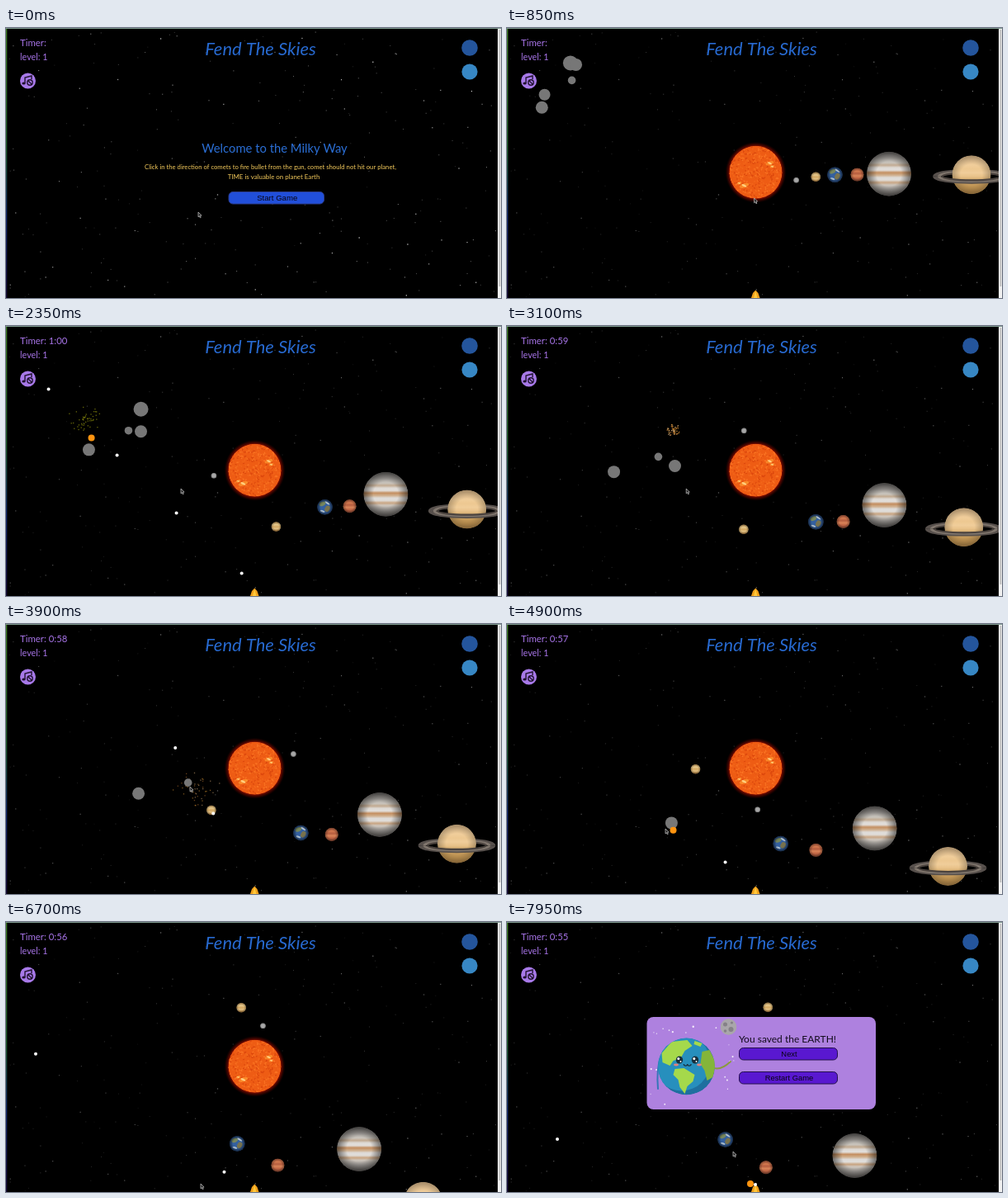
These frames come from a looping animation (600 by 327 pixels, 8 s). An HTML page with a canvas:

```html
<!DOCTYPE html>
<html lang="en">
<head>
<meta charset="utf-8">
<style>
  html, body { margin: 0; width: 100%; height: 100%; overflow: hidden; background: #000; }
  canvas { display: block; }
</style>
</head>
<body>
<canvas id="stage" width="600" height="327"></canvas>
<script>
const ctx = document.getElementById('stage').getContext('2d');
const TAU = Math.PI * 2;
const LOOP = 8000, START = 750, WIN = 7270;
const SUN = { x: 301.5, y: 174.8, r: 32 };
const GUN = { x: 301, y: 325 };
const BULLET_SPEED = 0.6;
const TITLE_FONT = 'Lato, sans-serif';
const BUTTON_FONT = '"Liberation Sans", Arial, sans-serif';

function seeded(seed) {
  return () => (seed = (seed * 16807) % 2147483647) / 2147483647;
}

function disc(x, y, r, fill) {
  ctx.fillStyle = fill;
  ctx.beginPath();
  ctx.arc(x, y, r, 0, TAU);
  ctx.fill();
}

function oval(x, y, rx, ry, fill, angle = 0) {
  ctx.fillStyle = fill;
  ctx.beginPath();
  ctx.ellipse(x, y, rx, ry, angle, 0, TAU);
  ctx.fill();
}

function shape(points, fill) {
  ctx.fillStyle = fill;
  ctx.beginPath();
  points.forEach(([x, y]) => ctx.lineTo(x, y));
  ctx.closePath();
  ctx.fill();
}

function text(string, x, y, size, color, family = TITLE_FONT, align = 'center', style = '') {
  ctx.font = `${style} ${size}px ${family}`;
  ctx.textAlign = align;
  ctx.fillStyle = color;
  ctx.fillText(string, x, y);
}

function box(x, y, w, h, r, fill, stroke) {
  ctx.beginPath();
  ctx.roundRect(x, y, w, h, r);
  ctx.fillStyle = fill;
  ctx.fill();
  if (stroke) {
    ctx.strokeStyle = stroke;
    ctx.lineWidth = 1;
    ctx.stroke();
  }
}

function button(label, x, y, w, h, size, fill, stroke) {
  box(x, y, w, h, 5, fill, stroke);
  text(label, x + w / 2 + 1, y + h / 2 + size * 0.36, size, '#080414', BUTTON_FONT);
}

// Runs draw with the origin at the centre of a circular clip.
function ball(x, y, r, draw) {
  ctx.save();
  ctx.translate(x, y);
  ctx.beginPath();
  ctx.arc(0, 0, r, 0, TAU);
  ctx.clip();
  draw(r);
  ctx.restore();
}

function shade(r, strength) {
  const g = ctx.createRadialGradient(0, 0, r * 0.55, 0, 0, r);
  g.addColorStop(0, 'rgba(0,0,0,0)');
  g.addColorStop(1, `rgba(0,0,0,${strength})`);
  disc(0, 0, r, g);
}

function banded(colors, strength) {
  return r => {
    const bands = ctx.createLinearGradient(0, -r, 0, r);
    colors.forEach((color, i) => bands.addColorStop((i + 0.5) / colors.length, color));
    disc(0, 0, r, bands);
    shade(r, strength);
  };
}

const jupiterBands = banded(['#85827f', '#9b9793', '#a7a39f', '#bcb8b2', '#c8c3bb', '#c2ab92', '#dedad5', '#e2deda',
  '#c48f61', '#cfae8c', '#dedbd8', '#e0ddd9', '#c9a684', '#cdc5bc', '#b5b0aa', '#a29e9a', '#918d89', '#7e7a77'], 0.5);
const saturnBands = banded(['#dcb98a', '#e8c594', '#f0cd9a', '#edc891', '#f0cd9a', '#e8c188',
  '#cda465', '#c59a5a', '#bf9352', '#b0864a'], 0.25);
const venusBands = banded(['#d0a868', '#e5c88c', '#d4a963', '#e0bf82', '#b98b4c'], 0.4);
const marsBands = banded(['#c66a48', '#d4794f', '#b55d3f', '#d98358', '#c06544', '#9f543b'], 0.4);

function drawEarth(r) {
  disc(0, 0, r, '#34609f');
  oval(-3, -4, 4, 2.5, '#76865d', -0.4);
  oval(3, 2, 3, 4, '#77724e', 0.5);
  oval(-3, 5, 3, 1.2, '#b3c8dc', 0.3);
  oval(3, -5, 3.5, 1, '#c2d2e2', 0.6);
  shade(r, 0.6);
}

const planets = [
  { orbit: 50, rate: 0.1078, r: 3.5, draw: r => { disc(0, 0, r, '#a8a8a8'); shade(r, 0.4); } },
  { orbit: 73, rate: 0.0432, r: 6, draw: venusBands },
  { orbit: 96, rate: 0.01727, r: 9.5, draw: drawEarth },
  { orbit: 123, rate: 0.01292, r: 8.2, draw: marsBands },
  { orbit: 161.5, rate: 0.00645, r: 27, draw: jupiterBands },
  { orbit: 261.5, rate: 0.0065, r: 23.5, draw: saturnBands, ringed: true },
];

function ring(x, y, from, to) {
  [[44.5, 6.6, '#57504c', 4.6], [39.5, 5.6, '#81776e', 3], [35.5, 4.6, '#4b433e', 2.2]].forEach(([rx, ry, color, width]) => {
    ctx.strokeStyle = color;
    ctx.lineWidth = width;
    ctx.beginPath();
    ctx.ellipse(x, y, rx, ry, 0, from, to);
    ctx.stroke();
  });
}

function drawPlanet(planet, now) {
  const angle = planet.rate * (now - START) * Math.PI / 180;
  const x = SUN.x + planet.orbit * Math.cos(angle);
  const y = SUN.y + planet.orbit * Math.sin(angle);
  if (planet.ringed) ring(x, y + 2, Math.PI, TAU);
  ball(x, y, planet.r, planet.draw);
  if (planet.ringed) ring(x, y + 2, 0, Math.PI);
}

function drawSun() {
  const glow = ctx.createRadialGradient(SUN.x, SUN.y, 29, SUN.x, SUN.y, 37);
  glow.addColorStop(0, '#d01c00');
  glow.addColorStop(0.35, '#7a0c00');
  glow.addColorStop(1, 'rgba(60,0,0,0)');
  disc(SUN.x, SUN.y, 37, glow);
  ball(SUN.x, SUN.y, SUN.r, r => {
    disc(0, 0, r, '#ee5c14');
    const random = seeded(77);
    for (let i = 0; i < 420; i++) {
      const a = random() * TAU, d = r * Math.sqrt(random());
      const color = ['#dc480d', '#fb7423', '#f2661a'][i % 3];
      oval(d * Math.cos(a), d * Math.sin(a), 1.3, 0.7, color, random() * 3);
    }
    [[17, -11, 5, 2.2], [-14, 16, 6, 2.5], [-20, 13, 3, 1.4], [20, -7, 3, 1.5]].forEach(([x, y, rx, ry]) => {
      oval(x, y, rx, ry, 'rgba(255,160,52,.65)', -0.3);
      oval(x, y, rx / 2, ry / 2, '#ffd080', 0.4);
    });
  });
}

// Comet position is given at 1450 ms, velocity in px per ms.
const comets = [
  { x: 111, y: 66, vx: 0.0578, vy: 0.0389, r: 9, hit: 3000 },
  { x: 115, y: 78, vx: 0.0533, vy: 0.0556, r: 7.5, hit: 3600 },
  { x: 106, y: 89, vx: 0.0466, vy: 0.0422, r: 4.8, hit: 4150 },
  { x: 65, y: 118, vx: 0.0388, vy: 0.0357, r: 7.5, hit: 4950 },
  { x: 69, y: 96, vx: 0.04, vy: 0.025, r: 7, hit: 2110 },
];

function cometAt(comet, now) {
  return [comet.x + 0.5 + comet.vx * (now - 1450), comet.y - 0.3 + comet.vy * (now - 1450)];
}

function drawComet(comet, now) {
  if (now < comet.hit) {
    disc(...cometAt(comet, now), comet.r, '#777');
    return;
  }
  const age = (now - comet.hit) / 650;
  if (age > 1) return;
  const [x, y] = cometAt(comet, comet.hit);
  const random = seeded(Math.round(comet.hit * 7));
  ctx.globalAlpha = 1 - age;
  for (let i = 0; i < 48; i++) {
    const a = random() * TAU, d = (4 + 44 * random()) * age;
    ctx.fillStyle = comet.hit < 2500 ? '#a5a60f' : ['#e09a34', '#b8742f', '#dcb07a'][i % 3];
    ctx.fillRect(x + d * Math.cos(a) * 1.3, y + d * Math.sin(a), 1.3, 1.3);
  }
  ctx.globalAlpha = 1;
}

// Each shot passes through (x, y) at time t.
const shots = [
  { x: 95, y: 112, t: 2110, end: 2110 },
  { x: 52, y: 77, t: 2350 },
  { x: 104, y: 136, t: 2350, end: 2420, orange: true },
  { x: 135, y: 157, t: 2350 },
  { x: 207, y: 227, t: 2350 },
  { x: 286, y: 300, t: 2350, end: 2800 },
  { x: 200, y: 126, t: 3000, end: 3000 },
  { x: 230, y: 198, t: 3600, end: 3600 },
  { x: 205.5, y: 150.5, t: 3900 },
  { x: 251.5, y: 230, t: 3900 },
  { x: 232, y: 203, t: 4150, end: 4150 },
  { x: 202, y: 250, t: 4900, end: 4950, orange: true },
  { x: 265, y: 289, t: 4900 },
  { x: 36.5, y: 160, t: 6700 },
  { x: 265, y: 303, t: 6700 },
  { x: 61, y: 263, t: WIN },
  { x: 295, y: 317, t: WIN, orange: true },
  { x: 301, y: 318, t: WIN },
];

function drawShot(shot, now) {
  const dx = shot.x - GUN.x, dy = shot.y - GUN.y, length = Math.hypot(dx, dy);
  const travel = length + BULLET_SPEED * (now - shot.t);
  if (travel < 0 || now > (shot.end || LOOP)) return;
  const k = travel / length;
  disc(GUN.x + dx * k, GUN.y + dy * k, shot.orange ? 4 : 2, shot.orange ? '#ff9410' : '#fff');
}

function drawGun() {
  shape([[296, 327], [298, 321], [301.3, 317.5], [304.5, 321], [306.5, 327]], '#f0a01c');
  shape([[299, 327], [300.5, 321], [301.3, 319], [302, 321], [303.5, 327]], '#ffc93c');
}

const stars = (() => {
  const random = seeded(4211);
  return Array.from({ length: 260 }, () => ({
    x: 3 + random() * 592, y: 3 + random() * 322, light: 0.2 + 0.6 * random() ** 2, size: 0.7 + 0.6 * random(),
  }));
})();

function drawSky(playing) {
  ctx.fillStyle = '#000';
  ctx.fillRect(0, 0, 600, 327);
  stars.forEach(star => {
    ctx.fillStyle = `rgba(225,225,225,${star.light * (playing ? 0.65 : 1.2)})`;
    ctx.fillRect(star.x, star.y, star.size, star.size);
  });
}

function drawWindowEdges() {
  const left = ctx.createLinearGradient(0, 0, 0, 327);
  left.addColorStop(0, '#3c7a22');
  left.addColorStop(0.45, '#1d5a2c');
  left.addColorStop(0.7, '#142a70');
  left.addColorStop(1, '#160a38');
  ctx.fillStyle = left;
  ctx.fillRect(0, 0, 1.3, 327);
  ctx.fillStyle = '#7f9a90';
  ctx.fillRect(0, 0, 600, 1);
  ctx.fillStyle = '#f4f4f4';
  ctx.fillRect(596, 1, 4, 326);
  ctx.fillStyle = '#c9c9c9';
  ctx.fillRect(597, 2, 2.5, 311);
}

function drawHeader(now) {
  const ticks = Math.floor((now - START) / 1000);
  const left = 61 - ticks;
  const clock = ticks < 1 ? '' : left === 60 ? ' 1:00' : ` 0:${left}`;
  text('Timer:' + clock, 17, 21.5, 11.4, '#a673e6', TITLE_FONT, 'left');
  text('level: 1', 17, 38.5, 10.8, '#a673e6', TITLE_FONT, 'left');
  text('Fend The Skies', 308.5, 33, 22, '#2769cf', TITLE_FONT, 'center', 'italic');
  disc(562, 24, 9.8, '#24559c');
  disc(562, 53, 9.6, '#3787c4');

  disc(26.5, 64, 9.5, '#a779e8');
  ctx.strokeStyle = '#21132f';
  ctx.lineWidth = 1.4;
  ctx.beginPath();
  ctx.moveTo(23, 67);
  ctx.lineTo(23, 60);
  ctx.lineTo(31, 58);
  ctx.lineTo(31, 62);
  ctx.stroke();
  oval(21.5, 67, 2.2, 1.6, '#21132f');
  ctx.beginPath();
  ctx.arc(29, 66, 3.2, 0, TAU);
  ctx.moveTo(27, 64);
  ctx.lineTo(31, 68);
  ctx.stroke();
}

function drawIntro() {
  text('Welcome to the Milky Way', 325.5, 151, 14.8, '#2b6fd6');
  text('Click in the direction of comets to fire bullet from the gun, comet should not hit our planet,', 320.5, 170.5, 7.7, '#f5cb5c');
  text('TIME is valuable on planet Earth', 324.5, 182.5, 7.9, '#f5cb5c');
  button('Start Game', 270, 198.5, 115.5, 14.5, 9.6, '#214fda', '#2a3c8c');
}

function drawCartoonEarth() {
  ctx.lineCap = 'round';
  ctx.lineWidth = 2;
  ctx.strokeStyle = '#3577b8';
  ctx.beginPath();
  ctx.moveTo(186, 164);
  ctx.quadraticCurveTo(181, 178, 183, 202);
  ctx.stroke();
  ctx.strokeStyle = '#8a9b3c';
  ctx.beginPath();
  ctx.moveTo(249, 176);
  ctx.quadraticCurveTo(258, 181, 271, 169);
  ctx.stroke();
  ctx.lineCap = 'butt';
  ball(217.5, 175, 34.5, r => {
    disc(0, 0, r, '#1f6f9f');
    disc(-6, -5, r, '#278fbd');
    shape([[-30, -16], [-18, -30], [1, -32], [7, -25], [-2, -19], [-7, -10], [-16, -7], [-20, -1], [-29, -5]], '#a5d94b');
    shape([[-14, 3], [-3, 2], [10, 10], [8, 18], [1, 24], [-2, 33], [-8, 25], [-10, 16], [-16, 10]], '#a5d94b');
    shape([[19, -18], [28, -20], [36, -4], [32, 13], [25, 17], [22, 5], [17, -3]], '#84b53a');
    shape([[10, -31], [19, -28], [17, -24], [9, -27]], '#a5d94b');
  });
  [209, 228].forEach(x => {
    oval(x, 167, 4.2, 4.6, '#182f3c');
    disc(x - 1.2, 165.5, 1.5, '#fff');
    disc(x + 1.5, 169, 0.9, '#fff');
    oval(x + (x < 215 ? -4 : 5), 173, 3, 1.4, '#e4827d');
  });
  ctx.strokeStyle = '#182f3c';
  ctx.lineWidth = 1.2;
  ctx.beginPath();
  ctx.arc(216.5, 172, 2.2, Math.PI, 0, true);
  ctx.arc(220.9, 172, 2.2, Math.PI, 0, true);
  ctx.stroke();
}

function drawPanel() {
  box(169.5, 115, 277.5, 112, 8, '#ae81df');
  const random = seeded(909);
  for (let i = 0; i < 28; i++) disc(174 + random() * 104, 119 + random() * 104, 0.5 + random() * 0.7, '#f3eafa');
  ball(268.5, 127, 10, r => {
    disc(0, 0, r, '#a9a6aa');
    [[-4, -3, 2.5], [3, 3, 3], [4, -5, 1.6], [-4, 5, 1.8]].forEach(([x, y, s]) => disc(x, y, s, '#858187'));
  });
  drawCartoonEarth();
  text('You saved the EARTH!', 340, 145.5, 12, '#120b1c');
  button('Next', 281.5, 152.5, 119, 14.5, 9.4, '#5918d0', '#24104c');
  button('Restart Game', 281.5, 181.5, 119, 14.5, 9.4, '#5918d0', '#24104c');
}

// Pointer path: time, x, y.
const pointer = [[0, 233, 223], [600, 302, 206], [800, 302, 206], [1450, 165, 201], [2350, 212, 197],
  [3900, 223, 197], [4900, 192, 248], [6450, 196, 257], [6700, 236, 317], [7950, 274, 278], [8000, 274, 278]];

function drawPointer(t) {
  const next = pointer.findIndex(key => key[0] > t);
  const [t0, x0, y0] = pointer[next - 1], [t1, x1, y1] = pointer[next];
  const k = (t - t0) / (t1 - t0), ease = k * k * (3 - 2 * k);
  ctx.save();
  ctx.translate(x0 + (x1 - x0) * ease, y0 + (y1 - y0) * ease);
  ctx.scale(0.9, 0.9);
  const arrow = [[0, 0], [0, 6.5], [1.5, 5.2], [2.6, 7.6], [3.6, 7.1], [2.6, 4.8], [4.5, 4.6]];
  shape(arrow, '#222');
  ctx.strokeStyle = '#c8c8c8';
  ctx.lineWidth = 0.8;
  ctx.stroke();
  ctx.restore();
}

function render() {
  const t = performance.now() % LOOP;
  const playing = t >= START;
  const now = Math.min(t, WIN);
  drawSky(playing);
  drawHeader(now);
  if (playing) {
    drawSun();
    planets.forEach(planet => drawPlanet(planet, now));
    comets.forEach(comet => drawComet(comet, now));
    drawGun();
    shots.forEach(shot => drawShot(shot, now));
    if (t >= WIN) drawPanel();
  } else {
    drawIntro();
  }
  drawWindowEdges();
  drawPointer(t);
  requestAnimationFrame(render);
}
render();
</script>
</body>
</html>
```
